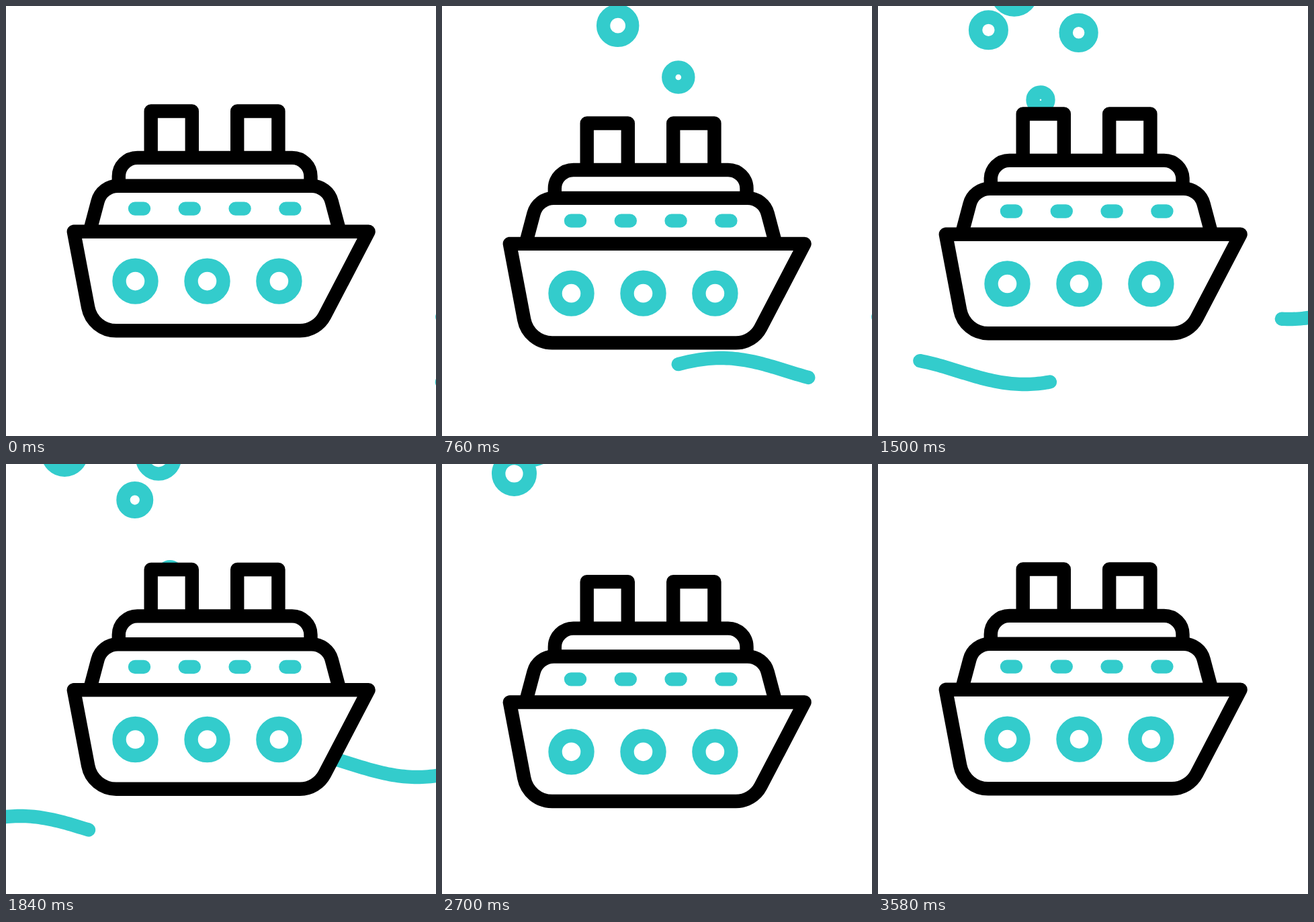
These frames come from a looping animation (640 px wide and 640 px high, 3600 ms). An HTML page:

```html
<!DOCTYPE html>
<html lang="en">
<head>
<meta charset="utf-8">
<title>Steamship</title>
<style>
  html, body { margin: 0; width: 100%; height: 100%; overflow: hidden; background: #fff; }
  svg { display: block; width: 100vw; height: 100vh; }
  .teal { fill: none; stroke: #3cc; stroke-width: 20.4; stroke-linecap: round; stroke-linejoin: round; }
  .body { fill: #fff; stroke: #000; stroke-width: 20.4; stroke-linejoin: round; }
</style>
</head>
<body>
<svg viewBox="0 0 640 640">
  <defs><path id="trail" d="M244 169C248 57 154 28 0 -69"/></defs>
  <g id="waves" class="teal"></g>
  <g id="ship">
    <g id="smoke" class="teal"></g>
    <g class="body">
      <path d="M215.7 226V156.5H276.8V226"/>
      <path d="M344.2 226V156.5H405.4V226"/>
      <path d="M167.8 267.7V253.6A27.7 27.7 0 0 1 195.5 225.9H425.8A27.7 27.7 0 0 1 453.5 253.6V267.7"/>
      <path d="M124.6 335.7L136.5 290.8A31 31 0 0 1 166.5 267.8H454.7A31 31 0 0 1 484.7 290.8L496.6 335.7"/>
      <path d="M100.8 335.8H539.6L474.2 461.1A41.5 41.5 0 0 1 437.5 483.3H164A42.5 42.5 0 0 1 122.2 448.7Z"/>
    </g>
    <g class="teal">
      <path d="M192 301.6h13m61.8 0h13m61.8 0h13m61.8 0h13"/>
      <circle cx="192.5" cy="409.6" r="24"/>
      <circle cx="299.5" cy="409.6" r="24"/>
      <circle cx="406.4" cy="409.6" r="24"/>
    </g>
  </g>
</svg>
<script>
const LOOP = 3600, HALF = 880, DIP = 19;
const $ = id => document.getElementById(id);
const ship = $('ship'), trail = $('trail');

const add = (parent, tag) =>
  $(parent).appendChild(document.createElementNS('http://www.w3.org/2000/svg', tag));

// dx: funnel offset, start in ms, rate: speed factor
const puffs = [
  [128.7, 0, 1], [128.7, 457, 1], [128.7, 915, 1],
  [0, 927, 1.06], [0, 1391, 1.06], [0, 1819, 1]
].map(([dx, start, rate]) => ({ dx, start, rate, el: add('smoke', 'circle') }));

const waves = [[543.5, 0], [446.5, 1377]]
  .map(([y, start]) => ({ y, start, el: add('waves', 'path') }));

function bob(t) {
  const n = Math.floor(t / HALF);
  if (n > 3) return 0;
  const x = t / HALF - n, s = x * x * (3 - 2 * x);
  return DIP * (n % 2 ? 1 - s : s);
}

function drawPuff({ dx, start, rate, el }, t) {
  const age = t - start;
  el.style.display = age < 0 ? 'none' : '';
  if (age < 0) return;
  const dist = 0.2877 * rate * age - 2.5e-5 * age * age;
  const p = trail.getPointAtLength(dist);
  el.setAttribute('cx', p.x + dx);
  el.setAttribute('cy', p.y);
  el.setAttribute('r', 9.5 + 0.059 * dist);
}

// A piece of a fixed sine line slides from right to left
function drawWave({ y, start, el }, t) {
  const edge = 649.3;
  const head = edge - 0.391 * Math.max(0, t - start);
  const tail = Math.min(edge, head + 193.5);
  const point = x => x.toFixed(2) + ' ' +
    (y - 19.5 * Math.cos((x - 415) / 197 * Math.PI)).toFixed(2);
  let d = 'M' + point(head);
  for (let x = head + 4; x < tail; x += 4) d += 'L' + point(x);
  el.setAttribute('d', d + 'L' + point(tail));
}

function draw() {
  const t = performance.now() % LOOP;
  ship.setAttribute('transform', `translate(0 ${bob(t)})`);
  puffs.forEach(p => drawPuff(p, t));
  waves.forEach(w => drawWave(w, t));
  requestAnimationFrame(draw);
}
draw();
</script>
</body>
</html>
```
